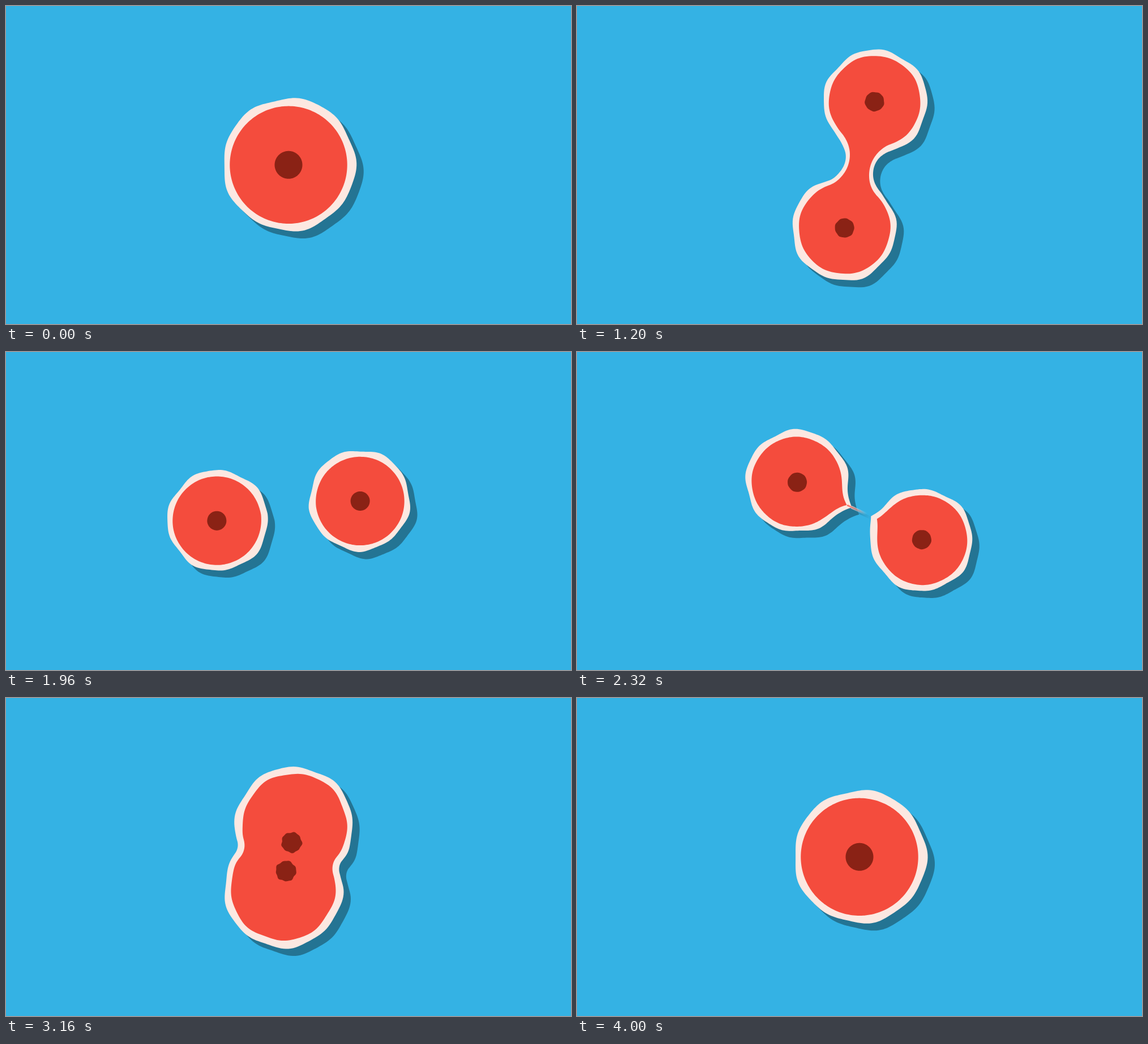
These frames come from a looping animation (998x561 px, 4.04 s). An HTML page with a canvas:

```html
<!DOCTYPE html>
<html lang="en">
<head>
<meta charset="utf-8">
<title>Cell division</title>
<style>
  html, body { margin: 0; width: 100%; height: 100%; overflow: hidden; background: #34b2e4; }
  canvas { display: block; width: 100%; height: 100%; }
</style>
</head>
<body>
<canvas id="stage" width="998" height="561"></canvas>
<script>
const ctx = document.getElementById('stage').getContext('2d');
const LOOP = 4040, STEP = 40, CX = 499, CY = 280.3, SHADOW = 12.5;
const SPREAD = 129.5, REACH = 120; // widest half distance, and where the neck tears
const COLOR = { water: '#34b2e4', shadow: '#247493', rim: '#fce8e1', body: '#f44c3d', core: '#8a2215' };
const { PI, sin, cos, exp, abs, min, max, hypot, atan2, sqrt } = Math;
const clamp = (x, lo, hi) => min(hi, max(lo, x));
const smooth = x => x * x * (3 - 2 * x);

// Slow start, fast middle, long settling towards 1.
const settle = (time, scale, power) => 1 - exp(-((max(0, time) / scale) ** power));
const apart = t => SPREAD * settle(t, 818, 2);
const bodyGap = t => apart(t) * settle(3980 - t, 1045, 2.3);
const coreGap = t => apart(t) * settle(3500 - t, 717, 2);

// Uneven edge: a few waves drifting round the cell, looping with the animation.
function wobble(amount, t, gap, shift) {
  const p = 2 * PI * t / LOOP, split = min(1, gap / 40);
  return (side, a) => {
    const s = shift + 2 * side * split;
    return amount * (cos(a + 0.5 + s + 2 * p) + 0.9 * sin(5 * a + 1 + s - 3 * p) + 0.8 * sin(9 * a + 2 - s + 4 * p));
  };
}

// From the far end of a cell round to the middle of the neck.
function quarter(gap, r, w) {
  const step = clamp(r - w, gap * 0.02, gap * 0.95);
  const h = (gap * gap - step * step) / (2 * step), f = h - (r - step);
  const touch = atan2(h, -gap), points = [];
  for (let i = 0; i <= 50; i++) {
    const a = touch * i / 50;
    points.push([gap + r * cos(a), r * sin(a)]);
  }
  const [x, y] = points[50];
  const start = atan2(y - h, x), end = f > 0 ? -PI / 2 : PI / 2;
  for (let i = 1; i <= 24; i++) {
    const a = start + (end - start) * i / 24;
    points.push([abs(f) * cos(a), h + abs(f) * sin(a)]);
  }
  return points;
}

// A lone cell, drawn out towards its twin by `pull`.
function drop(gap, r, pull) {
  return Array.from({ length: 180 }, (_, i) => {
    const a = -PI + i * PI / 90;
    const rr = r + pull * exp(-(PI - abs(a)) / 0.15);
    return [gap + rr * cos(a), rr * sin(a)];
  });
}

function outline({ axis, gap, r, w, pull = 0, edge }) {
  gap = max(gap, 0.01);
  const joined = w > 0.5;
  const q = joined ? quarter(gap, r, w) : [];
  const half = [...q.slice(1).reverse().map(([x, y]) => [x, -y]), ...q];
  const path = new Path2D();
  for (const side of [0, 1]) {
    const dir = axis + side * PI;
    const points = joined ? half : drop(gap, r, side ? pull / 2 : pull);
    points.forEach(([x, y], i) => {
      const dx = x - gap, len = max(hypot(dx, y), 0.01);
      const calm = joined ? min(1, gap / (0.4 * r)) * (1 - smooth(min(1, abs(x) / (0.4 * r)))) : 0;
      const k = 1 + edge(side, atan2(y, dx) + dir) * (1 - calm) / len;
      const px = gap + dx * k, py = y * k;
      const sx = CX + px * cos(dir) - py * sin(dir), sy = CY + px * sin(dir) + py * cos(dir);
      if (i === 0 && !(joined && side)) path.moveTo(sx, sy);
      else path.lineTo(sx, sy);
    });
    if (!joined || side) path.closePath();
  }
  return path;
}

function fill(path, color, shift = 0) {
  ctx.save();
  ctx.translate(shift, shift);
  ctx.fillStyle = color;
  ctx.fill(path);
  ctx.restore();
}

// The torn thread between the cells.
function strand(axis, alpha) {
  const line = (from, to, color, width, drop) => {
    const fade = ctx.createLinearGradient(from, 0, to, 0);
    fade.addColorStop(0, color);
    fade.addColorStop(1, color + '00');
    ctx.strokeStyle = fade;
    ctx.lineWidth = width;
    ctx.beginPath();
    ctx.moveTo(from, -drop);
    ctx.lineTo(to, -drop);
    ctx.stroke();
  };
  ctx.save();
  ctx.globalAlpha = alpha;
  ctx.translate(CX, CY);
  ctx.rotate(axis);
  line(16, -24, COLOR.shadow, 5, 3);
  line(16, -14, COLOR.rim, 5, 0);
  line(24, -10, COLOR.body, 3, 0);
  ctx.restore();
}

function draw(t) {
  const axis = (0.0904 * t - 5) * PI / 180;
  const gap = bodyGap(t), spread = gap / SPREAD;
  const r = 103.7 - 0.2 * gap, margin = 13 - 0.02 * gap;
  const torn = gap >= REACH;
  const w = torn ? 0 : max(1, r * (1 - (gap / REACH) ** 2) ** 0.6);
  const rimNeck = torn ? 0 : w + margin * (0.4 + 0.6 * min(1, w / 50));
  const pull = torn ? 26 * exp(-(((gap - REACH) / 4) ** 2)) : 0;
  const unrest = 4 * spread * (1 - spread);

  const cg = coreGap(t), cr = 17 + 7.5 * exp(-((cg / 18) ** 2));
  const cw = cr * sqrt(max(0, 1 - (cg / (1.3 * cr)) ** 2));

  const rim = outline({ axis, gap, r: r + margin, w: rimNeck, pull, edge: wobble(1.5, t, gap, 0) });
  const body = outline({ axis, gap, r, w, pull, edge: wobble(unrest, t, gap, 1) });
  const core = outline({ axis, gap: cg, r: cr, w: cw, edge: wobble(unrest * 0.7, t, cg, 2) });

  ctx.fillStyle = COLOR.water;
  ctx.fillRect(0, 0, 998, 561);
  fill(rim, COLOR.shadow, SHADOW);
  fill(rim, COLOR.rim);
  if (pull > 14) strand(axis, min(1, (pull - 14) / 6));
  fill(body, COLOR.body);
  fill(core, COLOR.core);
}

function tick() {
  const t = Math.floor(performance.now() % LOOP / STEP) * STEP;
  draw(t < 80 ? 0 : t);
  requestAnimationFrame(tick);
}
tick();
</script>
</body>
</html>
```
